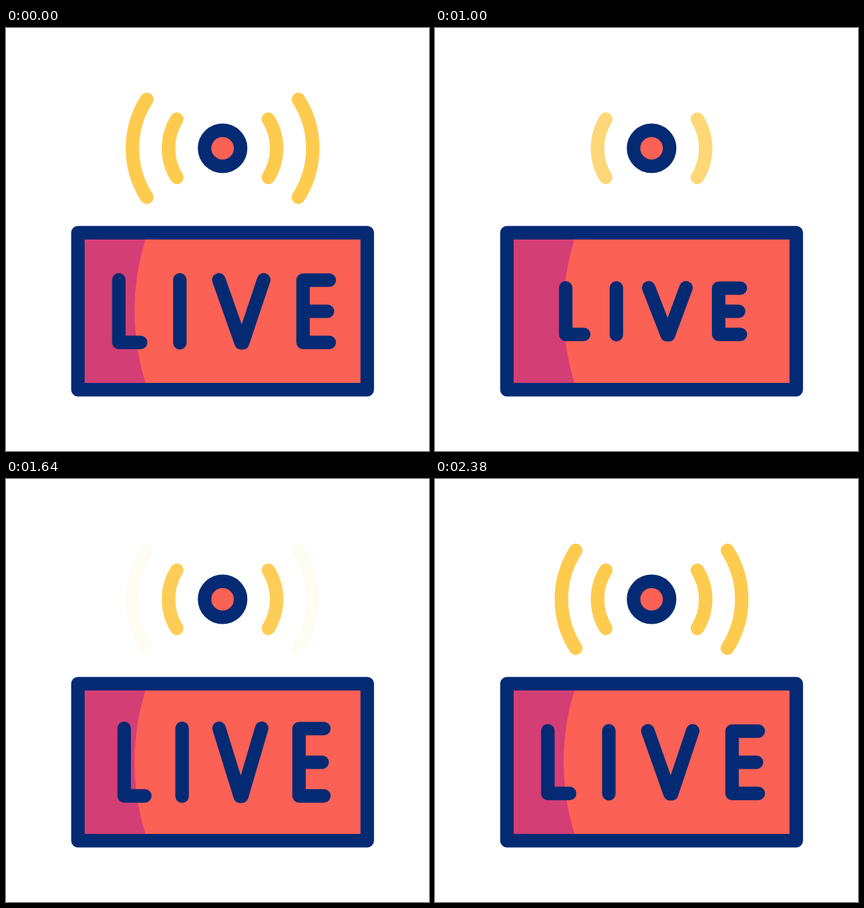
Recreate the animation shown at these times as an HTML page. Size 640 by 640 pixels, loop 2400 ms.

```html
<!DOCTYPE html>
<html lang="en">
<head>
<meta charset="utf-8">
<title>Live sign</title>
<style>
  html, body { margin: 0; width: 100%; height: 100%; overflow: hidden; background: #fff; }
  svg { display: block; width: 100%; height: 100%; }
  .line { fill: none; stroke-width: 20.4; stroke-linecap: round; stroke-linejoin: round; }
  .navy { stroke: #032a73; }
  .gold { stroke: #fecb4f; }
</style>
</head>
<body>
<svg viewBox="0 0 640 640" role="img" aria-label="LIVE">
  <path id="outer" class="line gold"/>
  <path id="inner" class="line gold"/>
  <circle cx="327.7" cy="182" r="27.3" fill="#fb6155"/>
  <circle class="line navy" cx="327.7" cy="182" r="27.3"/>
  <rect x="109" y="310" width="437" height="237" fill="#fb6155"/>
  <path fill="#d33e75" d="M109 320H211A365 365 0 0 0 211 537H109Z"/>
  <rect class="line navy" x="108.8" y="309.8" width="437.8" height="237.4"/>
  <path id="word" class="line navy"/>
</svg>
<script>
const LOOP = 2400, START = 200, END = 2370;
const CX = 329.9, CY = 428.6;
const $ = id => document.getElementById(id);

// eased 0 to 1 between times a and b
function ramp(t, a, b) {
  const p = Math.min(1, Math.max(0, (t - a) / (b - a)));
  return p * p * (3 - 2 * p);
}

// a mirrored pair of arcs, dx from the dot and 2 * dy tall
function waves(dx, dy, r) {
  const side = (s, sweep) =>
    `M${327.7 + s * dx} ${182 - dy}a${r} ${r} 0 0 ${sweep} 0 ${2 * dy}`;
  return side(-1, 0) + side(1, 1);
}

// the word scales with its half width w and half height h
function letters(w, h) {
  const x = k => CX + k * w;
  const top = CY - h, low = CY + h, bar = h - 0.5;
  const tip = x(0.169), stem = x(0.751), end = x(1);
  return `M${x(-1)} ${top}V${CY + bar}H${x(-0.793)}` +
    `M${x(-0.42)} ${top}V${low}` +
    `M${x(-0.0495)} ${top}L${tip - 1.2} ${low}H${tip + 1.2}L${x(0.377)} ${top}` +
    `M${end} ${CY - bar}H${stem}V${CY + bar}H${end}M${stem} ${CY}H${end - 2.6}`;
}

// three blinks, a little slower in the middle of the loop
function innerGlow(t) {
  const u = Math.min(1, Math.max(0, (t - START) / (END - START)));
  const turns = 3 * (u + 0.025 * Math.sin(2 * Math.PI * u));
  return 0.5 + 0.5 * Math.cos(2 * Math.PI * turns);
}

// off, one blink in the middle, then on again
function outerGlow(t) {
  return 1 - ramp(t, START, 500) + ramp(t, 1000, 1300) - ramp(t, 1300, 1700) + ramp(t, 2040, END);
}

function draw(now) {
  const t = now % LOOP;
  const rise = ramp(t, 1440, 1840);
  const shrink = ramp(t, START, 1440) - rise;
  const grow = rise - ramp(t, 1840, END);
  $("word").setAttribute("d", letters(159.2 - 38 * shrink + 21.8 * grow, 47.6 - 17 * shrink + 24.7 * grow));
  $("inner").setAttribute("opacity", innerGlow(t));
  $("outer").setAttribute("opacity", outerGlow(t));
}

$("outer").setAttribute("d", waves(114.7, 74, 137));
$("inner").setAttribute("d", waves(69.3, 44, 83.7));

let start = null;
function tick(now) {
  if (start === null) start = now;
  draw(now - start);
  requestAnimationFrame(tick);
}
draw(0);
requestAnimationFrame(tick);
</script>
</body>
</html>
```
